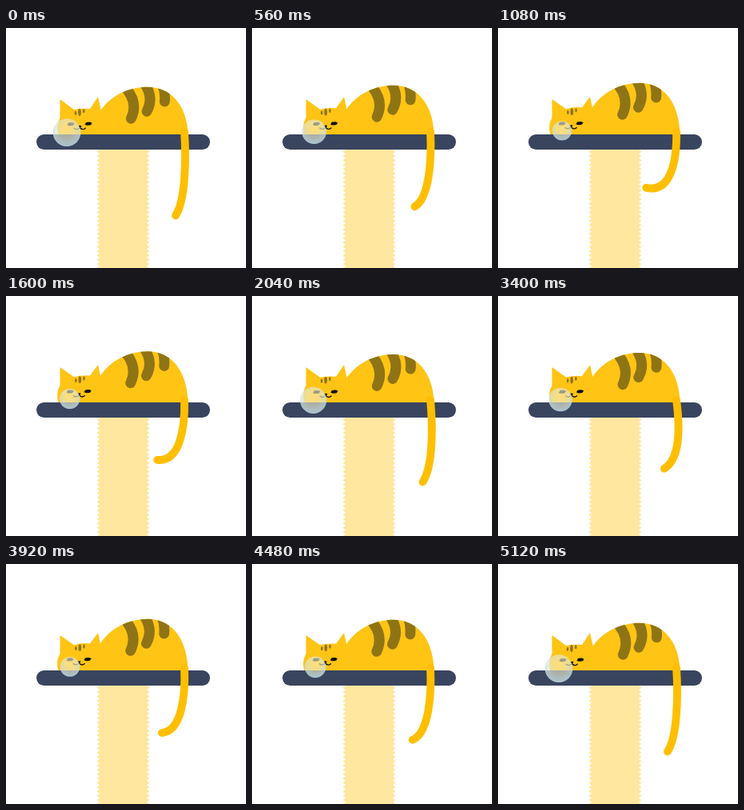
An HTML page for the animation above (5200 ms loop, 300 px wide and 300 px high).

```html
<!DOCTYPE html>
<html lang="en">
<head>
<meta charset="utf-8">
<title>Sleeping cat</title>
<style>
  html, body { margin: 0; width: 100%; height: 100%; overflow: hidden; background: #fff; }
  svg { display: block; width: 100%; height: 100%; }
</style>
</head>
<body>
<svg viewBox="0 0 300 300">
  <defs>
    <clipPath id="coat"><path id="coatShape"/></clipPath>
    <radialGradient id="film" cx=".5" cy=".38" r=".62">
      <stop stop-color="#fff3c4" stop-opacity=".55"/>
      <stop offset=".5" stop-color="#e6ead0" stop-opacity=".66"/>
      <stop offset="1" stop-color="#bdd9e3" stop-opacity=".86"/>
    </radialGradient>
    <g id="eye" stroke="#111" stroke-linecap="round">
      <path stroke-width="4" d="M-1.800 .200L1.800 0"/>
      <path stroke-width="1.200" d="M-3.900 .900L4 -.600"/>
    </g>
  </defs>

  <path id="post" fill="#ffe79f"/>
  <rect x="38" y="133" width="217" height="19" rx="9.500" fill="#39445f"/>

  <path id="body" fill="#ffc414"/>
  <g clip-path="url(#coat)">
    <g id="stripes" fill="none" stroke="#8f7415" stroke-width="12.800" stroke-linecap="round">
      <path d="M145 70Q167 91 156.300 113.300"/>
      <path d="M168 63Q187 84 176 104.300"/>
      <path d="M191 62Q200 76 198.300 92"/>
    </g>
  </g>
  <path id="head" fill="#ffc414"/>
  <g id="brow" fill="#8f7415">
    <ellipse cx="87" cy="106.300" rx="1.300" ry="2.600"/>
    <ellipse cx="92" cy="105.500" rx="1.800" ry="4.400"/>
    <ellipse cx="97.200" cy="103.700" rx="1.300" ry="2.600"/>
  </g>
  <g id="face">
    <use href="#eye" x="81" y="120"/>
    <use href="#eye" x="103" y="119.600"/>
    <path fill="none" stroke="#111" stroke-width="1.300" stroke-linecap="round"
      d="M85.200 125.200Q88.500 128.300 92.300 124.500Q95.500 128.300 99.300 125.200"/>
    <path d="M90.300 122.300Q92.500 121.300 94.600 122.300L92.600 125.300Z" fill="#111"/>
  </g>

  <path id="tail" fill="none" stroke="#ffbf00" stroke-width="9.800" stroke-linecap="round"/>
  <circle id="bubble" fill="url(#film)"/>
</svg>
<script>
const LOOP = 5200, STEP = 40, LAST = 5120;
const el = id => document.getElementById(id);
const set = (id, attrs) => {
  for (const name in attrs) el(id).setAttribute(name, attrs[name]);
};

// Smooth 0-1-0 swell around a peak time
function swell(t, peak, rise, fall = rise) {
  const u = (t - peak) / (t < peak ? rise : fall);
  return Math.abs(u) < 1 ? Math.cos(u * Math.PI / 2) ** 2 : 0;
}

// Two breaths per loop; the tail curls with each and leans out in between
const breath = t => .92 * swell(t, 1340, 1340, 930) + .86 * swell(t, 4150, 1500, 1020);
const curl = t => swell(t, 1340, 1220, 800) + .6 * swell(t, 4000, 1700, 1150);
const lean = t => swell(t, 2900, 1200);
const twitch = t => swell(t, 2680, 240);

function postPath() {
  const pitch = 5.4;
  let left = "", right = "";
  for (let y = 152; y < 306; y += pitch) {
    left = `L113.500 ${y + pitch / 2}L117 ${y}` + left;
    right += `L176 ${y}L179.500 ${y + pitch / 2}`;
  }
  return `M117 150${right}${left}Z`;
}

function drawBody(air) {
  const top = 73.7 - 6 * air, neck = 105 - 5 * air;
  const d = `M110 133L117 ${neck}C130 ${84 - 5.5 * air} 154 ${top} 177 ${top}` +
    `C205 ${top} 226 ${95 - 6 * air} 227.500 133Z`;
  set("body", { d });
  set("coatShape", { d });
  set("stripes", { transform: `translate(${-.8 * air} ${-6 * air})` });
}

function drawHead(air, ear) {
  const lift = 2 * air;
  set("head", {
    d: `M65.500 133Q61.800 122 67.500 112L${67.5 + 3.5 * ear} ${89 - 3 * ear}L85 ${102 - lift / 2}` +
      `Q95 ${100 - lift} 105 ${101 - lift}L115 86L119 104L128 133Z`
  });
  set("brow", { transform: `translate(${.4 * air} ${-air})` });
  set("face", { transform: `translate(${-1.2 * air} ${-.8 * air})` });
}

function drawTail(c, l) {
  set("tail", {
    d: `M223 130C${225 - 1.5 * c + 4 * l} ${160 + 4 * c - 5 * l} ` +
      `${225 - 9 * c + 13 * l} ${215 - 9 * c - 13 * l} ` +
      `${212 - 30 * c + 14 * l} ${234.5 - 39 * c - 3 * l}`
  });
}

function draw(t) {
  const air = breath(t);
  drawBody(air);
  drawHead(air, twitch(t));
  drawTail(curl(t), lean(t));
  set("bubble", { cx: 76 + 4.8 * air, cy: 130.7 - 2.8 * air, r: 17.4 - 6.2 * air });
}

function tick() {
  const t = performance.now() % LOOP;
  draw(Math.min(LAST, Math.floor(t / STEP) * STEP));
  requestAnimationFrame(tick);
}

set("post", { d: postPath() });
tick();
</script>
</body>
</html>
```
